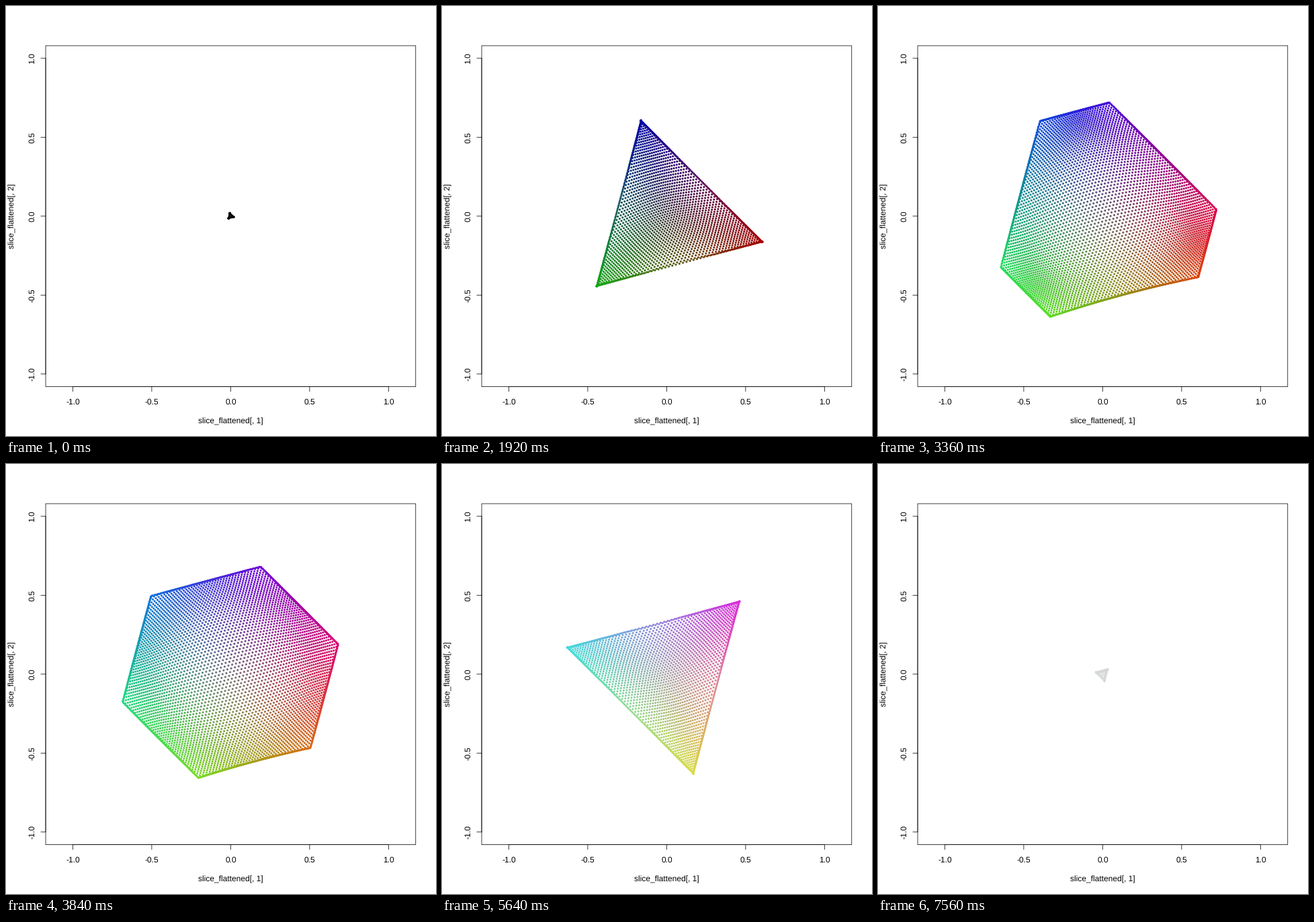
A matplotlib script for the animation above (7680 ms loop, 640 px wide and 640 px high).

```python
import numpy as np
import matplotlib.pyplot as plt
from matplotlib.animation import FuncAnimation
from matplotlib.patches import Rectangle

SIZE, DPI = 640, 100
FRAMES, INTERVAL = 64, 120
PX = 72 / DPI                     # one pixel in points
LEFT, RIGHT, TOP, BOTTOM = 59.04, 609.76, 59.04, 566.56
CX, CY = (LEFT + RIGHT) / 2, (TOP + BOTTOM) / 2
UNIT = (BOTTOM - TOP) / 2.16
GRID = 0.0135                     # channel step of the dot lattice
MARGIN = 0.055                    # lattice beyond the cube, folded onto its faces
FIRST, STEP = 0.02, 0.0465        # channel sum of the first slice, rise per slice
PEAK, PERIOD, CROWDING = 0.1, 0.8, 0.3

plt.rcParams["font.family"] = "Liberation Sans"
plt.rcParams["text.hinting"] = "no_hinting"


def crowd(c):
    """Draw channel values together near both ends of their range."""
    wave = 2 * np.pi / PERIOD
    return c - CROWDING / wave * np.sin(wave * (c - PEAK))


def fit_cube(rgb, total):
    """Push colors into the cube while keeping their channel sum."""
    for _ in range(8):
        rgb = rgb + (total - rgb.sum(axis=1, keepdims=True)) / 3
        rgb = np.clip(rgb, 0, 1)
        # Strong yellows cannot reach zero blue.
        floor = 0.12 * np.maximum(0, rgb[:, 0] * rgb[:, 1] - 0.25)
        rgb[:, 2] = np.maximum(rgb[:, 2], floor)
    return rgb


def color_slice(total):
    steps = np.arange(-MARGIN, 1 + MARGIN, GRID)
    r, g = (m.ravel() for m in np.meshgrid(steps, steps))
    b = total - r - g
    inside = (b >= -MARGIN) & (b <= 1 + MARGIN)
    rgb = np.column_stack([r, g, b])[inside]
    return fit_cube(crowd(rgb), total)


def flatten(rgb):
    """Look along the grey diagonal and return pixel positions."""
    angles = np.radians([-15, 225, 105])
    axes = np.sqrt(2 / 3) * np.column_stack([np.cos(angles), np.sin(angles)])
    xy = rgb @ axes
    return np.column_stack([CX + UNIT * xy[:, 0], CY - UNIT * xy[:, 1]])


def tint(rgb):
    """Darken a little and let green leak into red and blue."""
    leak = 0.12 * rgb[:, 1:2] * (1 - rgb)
    return np.clip(0.86 * rgb + leak * [1, 0, 1], 0, 1)


fig = plt.figure(figsize=(SIZE / DPI, SIZE / DPI), dpi=DPI, facecolor="white")
ax = fig.add_axes([0, 0, 1, 1])
ax.set_xlim(0, SIZE)
ax.set_ylim(SIZE, 0)
ax.axis("off")
STROKE = dict(lw=0.75 * PX, snap=False)


def line(x, y):
    ax.plot(x, y, color="black", solid_capstyle="round", **STROKE)


def label(x, y, text, rotation=0):
    ax.text(x, y, text, size=12 * PX, color="black", rotation=rotation,
            ha="center", va="baseline", rotation_mode="anchor")


def draw_axes():
    ax.add_patch(Rectangle((LEFT, TOP), RIGHT - LEFT, BOTTOM - TOP,
                           fill=False, ec="black", **STROKE))
    line([CX - UNIT, CX + UNIT], [BOTTOM, BOTTOM])
    line([LEFT, LEFT], [CY - UNIT, CY + UNIT])
    for value in (-1, -0.5, 0, 0.5, 1):
        x, y = CX + UNIT * value, CY - UNIT * value
        line([x, x], [BOTTOM, BOTTOM + 7.2])
        line([LEFT - 7.2, LEFT], [y, y])
        label(x, 593, f"{value:.1f}")
        label(42, y, f"{value:.1f}", 90)
    label(CX, 622, "slice_flattened[, 1]")
    label(13, CY, "slice_flattened[, 2]", 90)


draw_axes()
dots = ax.scatter([], [], s=(3.1 * PX) ** 2, linewidths=0, zorder=3)


def update(i):
    rgb = color_slice(FIRST + STEP * i)
    dots.set_offsets(flatten(rgb))
    dots.set_facecolors(tint(rgb))
    return dots,


anim = FuncAnimation(fig, update, frames=FRAMES, interval=INTERVAL,
                     init_func=lambda: update(0), repeat=True, repeat_delay=0)
plt.show()
```
